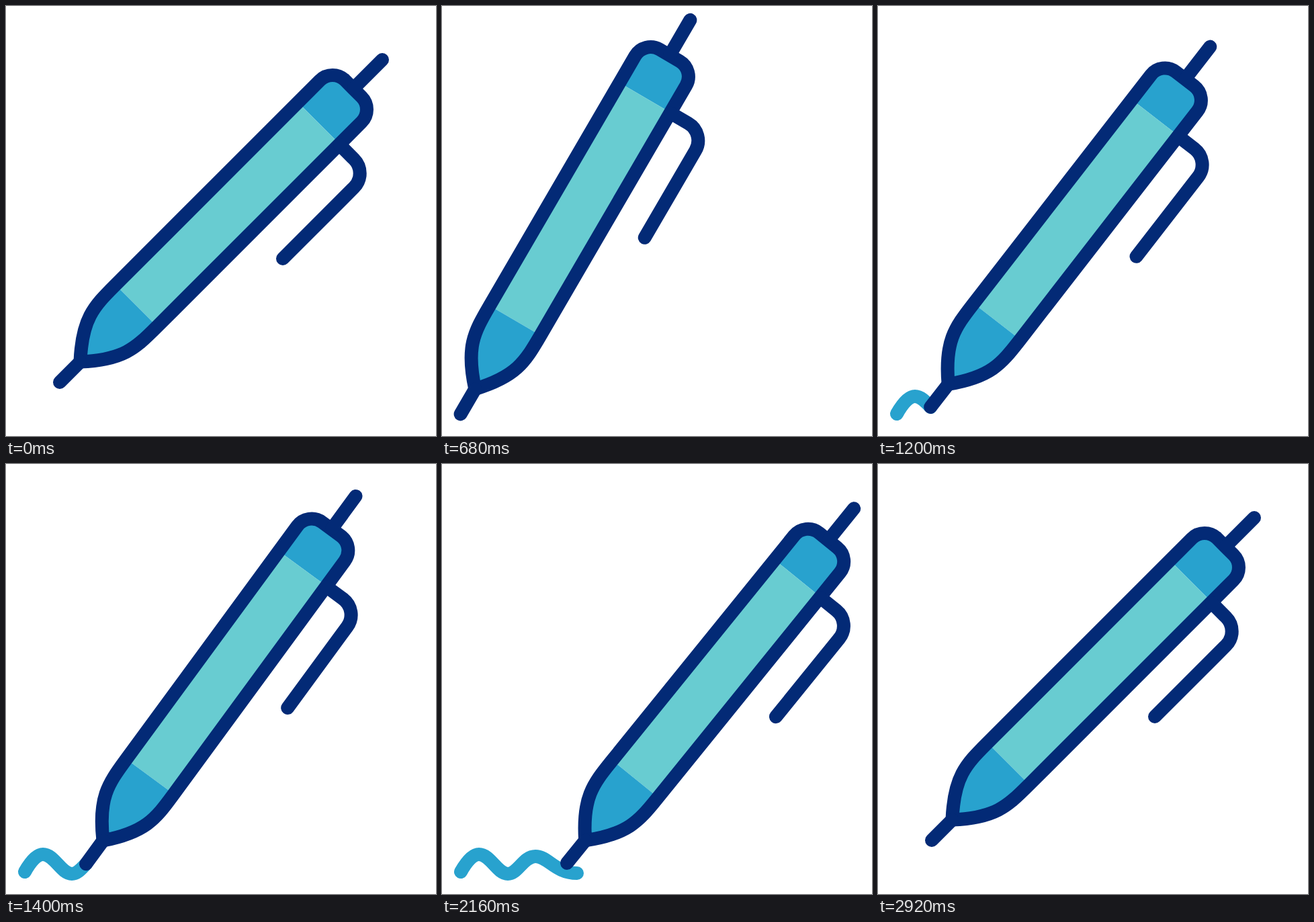
An HTML page for the animation above (3 s loop, 640x640 px).

```html
<!DOCTYPE html>
<html lang="en">
<head>
<meta charset="utf-8">
<title>Writing pen</title>
<style>
  html, body { margin: 0; width: 100%; height: 100%; overflow: hidden; background: #fff; }
  svg { display: block; width: 100%; height: 100%; }
  .line { fill: none; stroke: #032a76; stroke-width: 20; stroke-linecap: round; stroke-linejoin: round; }
  #ink { fill: none; stroke: #28a2ce; stroke-width: 20; stroke-linecap: round; stroke-linejoin: round; }
  .dark { fill: #28a2ce; }
  .light { fill: #68ccd1; }
</style>
</head>
<body>
<svg viewBox="0 0 640 640">
  <path id="ink" d="M28 607C37 591 46 581 55 581C72 581 82 610 98 610C113 610 121 584 139 584C158 584 168 609 201 609"/>
  <g id="pen">
    <path class="dark" d="M434.5 143.5L467.2 110.8A26.6 26.6 0 0 1 504.8 110.8L529.2 135.2A26.6 26.6 0 0 1 529.2 172.8L496.5 205.5Z"/>
    <path class="light" d="M434.5 143.5L496.5 205.5L225 477L163 415Z"/>
    <path class="dark" d="M163 415L162 416C130 448 113 466 110.5 529.5C174 527 192 510 224 478L225 477Z"/>
    <path class="line" d="M110.5 529.5C113 466 130 448 162 416L467.2 110.8A26.6 26.6 0 0 1 504.8 110.8L529.2 135.2A26.6 26.6 0 0 1 529.2 172.8L224 478C192 510 174 527 110.5 529.5Z"/>
    <path class="line" d="M80 560L110.5 529.5M518 122L560 80M497 207L518 228A29.7 29.7 0 0 1 518 270L412 376"/>
  </g>
</svg>
<script>
  const LOOP = 3000, STEP = 40;
  const WRITE_START = 960, WRITE_END = 1840, FADE_START = 2335, FADE_END = 2600;
  const ink = document.getElementById('ink');
  const pen = document.getElementById('pen');

  // Smooth interpolation through [time, value] keys without overshoot.
  function track(keys) {
    const last = keys.length - 1;
    const rate = i => (keys[i + 1][1] - keys[i][1]) / (keys[i + 1][0] - keys[i][0]);
    const slope = keys.map((_, i) => {
      if (i === 0 || i === last) return 0;
      const a = rate(i - 1), b = rate(i);
      return a * b > 0 ? 2 * a * b / (a + b) : 0;
    });
    return t => {
      if (t <= keys[0][0]) return keys[0][1];
      if (t >= keys[last][0]) return keys[last][1];
      const i = keys.findIndex(k => k[0] > t) - 1;
      const [t0, v0] = keys[i], [t1, v1] = keys[i + 1];
      const d = t1 - t0, u = (t - t0) / d, w = 1 - u;
      return w * w * (1 + 2 * u) * v0 + u * u * (1 + 2 * w) * v1
        + d * u * w * (w * slope[i] - u * slope[i + 1]);
    };
  }

  function pointTrack(keys) {
    const x = track(keys.map(k => [k[0], k[1]]));
    const y = track(keys.map(k => [k[0], k[2]]));
    return t => ({ x: x(t), y: y(t) });
  }

  // The ink runs left to right, so x alone finds the drawn length.
  const total = ink.getTotalLength();
  function lengthAtX(x) {
    let low = 0, high = total;
    for (let i = 0; i < 24; i++) {
      const mid = (low + high) / 2;
      if (ink.getPointAtLength(mid).x < x) low = mid; else high = mid;
    }
    return low;
  }

  const approach = pointTrack([
    [100, 80, 560], [165, 81.7, 560], [360, 34, 601], [480, 20, 617],
    [640, 27.5, 607.5], [WRITE_START, 28, 607]
  ]);
  const retreat = pointTrack([
    [WRITE_END, 201, 609], [2320, 174, 588.6], [2560, 151, 590.5], [2910, 80, 560]
  ]);
  const tilt = track([
    [100, 45], [165, 44.9], [360, 55.5], [480, 58.9], [640, 60.1], [800, 57], [1000, 52.5],
    [1200, 52.2], [1400, 53.74], [1760, 53.53], [WRITE_END, 53.3], [2320, 49.93], [2560, 49.02], [2910, 45]
  ]);
  const drawn = track([
    [WRITE_START, 0], [1000, lengthAtX(34.5)], [1400, lengthAtX(119)],
    [1760, lengthAtX(186)], [WRITE_END, total]
  ]);

  function draw(t) {
    const length = drawn(t);
    const tip = t < WRITE_START ? approach(t)
      : t < WRITE_END ? ink.getPointAtLength(length) : retreat(t);
    pen.setAttribute('transform',
      `translate(${tip.x} ${tip.y}) rotate(${45 - tilt(t)}) translate(-80 -560)`);

    const fade = (FADE_END - t) / (FADE_END - FADE_START);
    ink.style.opacity = t > WRITE_START ? Math.max(0, Math.min(1, fade)) : 0;
    ink.style.strokeDasharray = `${length} ${total + 50}`;
  }

  function tick() {
    draw(Math.floor(performance.now() % LOOP / STEP) * STEP);
    requestAnimationFrame(tick);
  }
  tick();
</script>
</body>
</html>
```
